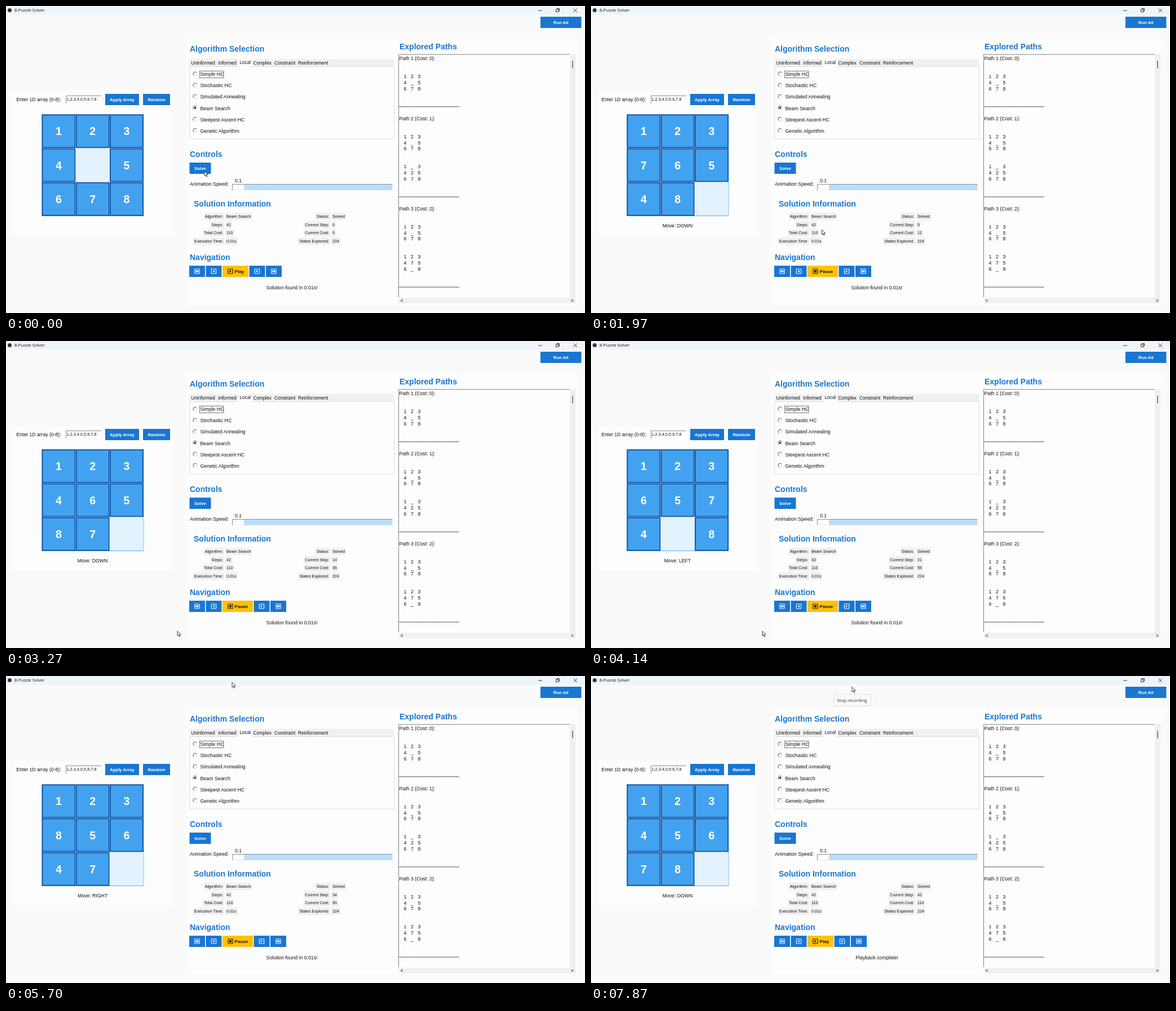
An HTML page that plays this animation: 1027x545 px, repeating every 7900 ms.

```html
<!DOCTYPE html>
<html lang="en">
<head>
<meta charset="utf-8">
<title>8-Puzzle Solver</title>
<style>
  html, body { margin: 0; height: 100%; overflow: hidden; background: #fafafb; }
  svg { display: block; width: 100vw; height: 100vh; }
  text { font-family: "Liberation Sans", Arial, sans-serif; white-space: pre; }
  .ui { font-family: "Open Sans", sans-serif; }
</style>
</head>
<body>
<svg id="stage" viewBox="0 0 1027 545"></svg>
<script>
const LOOP = 7900;
const BLUE = '#1976d2', INK = '#111', GREY = '#f0f0f0', PANEL = '#fdfdfd';
const stage = document.getElementById('stage');

// ---------- drawing helpers ----------
function el(tag, attrs, parent = stage) {
  const node = document.createElementNS(stage.namespaceURI, tag);
  for (const key in attrs) node.setAttribute(key, attrs[key]);
  return parent.appendChild(node);
}
const rect = (x, y, width, height, fill, more, parent) =>
  el('rect', { x, y, width, height, fill, ...more }, parent);
const path = (d, stroke, more, parent) =>
  el('path', { d, stroke, fill: 'none', ...more }, parent);

// y is the middle of the capitals
function text(x, y, content, size = 8.75, more = {}, parent) {
  const node = el('text', { x, y: y + size * 0.36, 'font-size': size, fill: INK, ...more }, parent);
  node.textContent = content;
  return node;
}
const MID = { 'text-anchor': 'middle' };
const BOLD = { 'font-weight': 700 };
const heading = (x, y, content) => text(x, y, content, 14, { ...BOLD, fill: BLUE });

function button(x, y, w, h, label) {
  rect(x, y, w, h, BLUE);
  text(x + w / 2, y + h / 2, label, 7.8, { ...MID, ...BOLD, fill: '#fff' });
}

// text on a grey box that fits its content; returns a setter
function chip(x, y, content, alignEnd) {
  const box = rect(x, y - 6.5, 0, 13, GREY);
  const label = text(x, y, content, 7.2, alignEnd ? { 'text-anchor': 'end' } : {});
  const set = value => {
    if (label.textContent === value && box.getAttribute('width') > 0) return;
    label.textContent = value;
    const w = label.getComputedTextLength();
    box.setAttribute('width', w + 4);
    box.setAttribute('x', (alignEnd ? x - w : x) - 2);
  };
  set(content);
  return set;
}

const ICONS = {
  edge: 'M-2.5-1.6h5v3.2h-5z',
  prev: 'M1.5-2.3v4.6l-3.4-2.3z',
  next: 'M-1.5-2.3v4.6l3.4-2.3z',
  stop: 'M-2-2h4v4h-4z',
};
function icon(x, y, kind, color, parent) {
  const g = el('g', { transform: `translate(${x} ${y})` }, parent);
  rect(-4.2, -4, 8.4, 8, 'none', { stroke: color, 'stroke-width': 1.1, rx: 0.8 }, g);
  el('path', { d: ICONS[kind], fill: color }, g);
}

// ---------- window ----------
rect(0, 0, 1027, 15.5, '#eff4f9');
el('circle', { cx: 6.5, cy: 7.5, r: 3.5, fill: '#30363d' });
text(15, 7.5, '8-Puzzle Solver', 7.7, { class: 'ui' });
path('M944 8h7M1006.5 4.5l6.5 6.5m0-6.5l-6.5 6.5M975.5 6h4.5v4.5h-4.5zM977 6v-1.5h4.5v4.5h-1.5', '#222',
  { 'stroke-width': 0.9 });
button(948, 19, 72.5, 20, 'Run All');

// ---------- board panel ----------
rect(13, 152, 281, 256, PANEL);
text(18.5, 166, 'Enter 1D array (0-8):', 8.65);
rect(106, 159, 63, 14, '#fff');
path('M106.5 173v-13.5h62.5', '#8a8a8a');
text(107.5, 165.7, '1,2,3,4,0,5,6,7,8', 7.35);
button(176, 156, 60, 20, 'Apply Array');
button(243, 156, 48, 20, 'Random');

rect(63.7, 192.5, 180.2, 180, 'none', { stroke: '#42a5f5' });
const PITCH = 60.2;
const cells = Array.from({ length: 9 }, (_, i) => {
  const x = 63.5 + (i % 3) * PITCH, y = 192.3 + Math.floor(i / 3) * PITCH;
  rect(x, y, 59.6, 59.4, '#e3f2fd');
  const tile = el('g');
  rect(x + 1, y + 1, 58, 58, '#43a2ef', { stroke: '#0f4f9f', 'stroke-width': 1.8 }, tile);
  const digit = text(x + 30, y + 30, '', 19.5, { ...MID, ...BOLD, fill: '#fff' }, tile);
  return { tile, digit };
});
const moveLabel = text(153.5, 390, '', 8.7, MID);

// ---------- algorithm panel ----------
rect(320, 56, 694, 475, PANEL);
heading(326, 75.5, 'Algorithm Selection');
rect(325, 94, 363, 13, GREY);
rect(325.5, 107.5, 363, 128.5, PANEL, { stroke: '#dcdcdc' });
rect(412, 92, 24, 16, PANEL);
[[328.5, 'Uninformed'], [376.5, 'Informed'], [414.5, 'Local'], [438.5, 'Complex'],
 [476, 'Constraint'], [518, 'Reinforcement']]
  .forEach(([x, name]) => text(x, name === 'Local' ? 100 : 101.5, name, 8.2));

['Simple HC', 'Stochastic HC', 'Simulated Annealing', 'Beam Search', 'Steepest Ascent HC', 'Genetic Algorithm']
  .forEach((name, i) => {
    const y = 121.2 + i * 20.05;
    el('circle', { cx: 335.5, cy: y - 0.5, r: 3.5, fill: '#fff', stroke: '#d0d0d0', 'stroke-width': 0.8 });
    path(`M333 ${y + 2}a3.5 3.5 0 0 1 5-5`, '#555');
    if (name === 'Beam Search') el('circle', { cx: 335.5, cy: y - 0.5, r: 1.7, fill: '#000' });
    text(344.5, y, name, 8.8);
  });
rect(343.5, 115.5, 42.5, 12, 'none', { stroke: '#555', 'stroke-width': 0.8 });

// ---------- controls ----------
heading(326, 263, 'Controls');
button(325.5, 278, 38, 20, 'Solve');
text(326, 315.5, 'Animation Speed:');
text(412, 309.5, '0.1', 8.75, MID);
rect(401, 316, 284.5, 11, '#bbdefb');
rect(402, 317, 20, 9.5, PANEL);
path('M401.5 327v-10.5h284', '#8a8f94');

// ---------- solution information ----------
heading(333, 351, 'Solution Information');
const INFO_Y = [373.5, 388.2, 402.9, 417.6];
[['Algorithm:', 'Beam Search', 'Status:', 'Solved'],
 ['Steps:', '42', 'Current Step:', '0'],
 ['Total Cost:', '110', 'Current Cost:', '0'],
 ['Execution Time:', '0.01s', 'States Explored:', '224']]
  .forEach(([a, b, c, d], i) => {
    chip(385, INFO_Y[i], a, true);
    chip(391, INFO_Y[i], b);
    chip(573, INFO_Y[i], c, true);
    if (i === 0 || i === 3) chip(579, INFO_Y[i], d);
  });
const setStep = chip(579, INFO_Y[1], '0');
const setCost = chip(579, INFO_Y[2], '0');

// ---------- navigation ----------
heading(326, 446, 'Navigation');
function navButton(x, kind, parent) {
  rect(x, 461, 28, 20, BLUE, {}, parent);
  icon(x + 14, 471, kind, '#fff', parent);
}
function toggle(label, kind, width) {
  const g = el('g');
  rect(384, 461, width, 20, '#ffc107', {}, g);
  icon(398, 471, kind, INK, g);
  text(405.5, 471, label, 8.1, BOLD, g);
  navButton(385.5 + width, 'next', g);
  navButton(415 + width, 'edge', g);
  return g;
}
navButton(325, 'edge');
navButton(354.5, 'prev');
const playGroup = toggle('Play', 'next', 46);
const pauseGroup = toggle('Pause', 'stop', 54);
const message = text(507, 500, '', 8.7, MID);

// ---------- explored paths ----------
heading(698, 72, 'Explored Paths');
rect(1000, 85, 10.5, 443, GREY);
rect(697, 518, 313, 10, GREY);
path('M696.5 517v-431h303', '#808080');
rect(1004, 97, 2, 13.5, '#858585');
el('path', { d: 'M699 523l4.5-3v6zM1007.5 523l-4.5-3v6z', fill: '#8f8f8f' });

const lineY = n => 93 + n * 10.675;
function miniGrid(line, tiles) {
  [...tiles].forEach((c, i) =>
    text(708 + (i % 3) * 12.5, lineY(line + Math.floor(i / 3)), c, 8.75, MID));
}
[0, 10, 25].forEach((line, i) => text(697.5, lineY(line), `Path ${i + 1} (Cost: ${i}):`));
[8, 23, 38].forEach(line => path(`M697.5 ${lineY(line) + 0.4}h106.5`, '#222', { 'stroke-dasharray': '2.1 .57' }));
[3, 13, 28].forEach(line => miniGrid(line, '1234_5678'));
miniGrid(18, '1_3425678');
miniGrid(33, '1234756_8');

// ---------- overlay ----------
const tooltip = el('g');
rect(430.5, 34, 66, 20, '#00000018', { rx: 2.5 }, tooltip);
rect(430.5, 33, 66, 20, '#f9f9f9', { rx: 2, stroke: '#dedede', 'stroke-width': 0.8 }, tooltip);
text(463, 42.8, 'Stop recording', 7.8, { ...MID, class: 'ui', fill: '#333' }, tooltip);
const cursor = el('path', {
  d: 'M0 0v8.6l2-1.9 1.5 3.4 1.4-.6-1.5-3.3h2.8z', fill: '#fff', stroke: '#111', 'stroke-width': 0.8,
});

// ---------- solution: every blank move with its cost ----------
const MOVES = {
  U: { name: 'UP', shift: -3, cost: 1 },
  D: { name: 'DOWN', shift: 3, cost: 2 },
  L: { name: 'LEFT', shift: -1, cost: 3 },
  R: { name: 'RIGHT', shift: 1, cost: 4 },
};
const states = [{ board: [1, 2, 3, 4, 0, 5, 6, 7, 8], cost: 0, label: '' }];
for (const key of 'DLURDRULLDRURDLLURRDLULDRRULDLURDRULLDRURD') {
  const { board, cost } = states[states.length - 1];
  const move = MOVES[key], next = [...board], from = board.indexOf(0);
  [next[from], next[from + move.shift]] = [next[from + move.shift], 0];
  states.push({ board: next, cost: cost + move.cost, label: 'Move: ' + move.name });
}

// ---------- timeline ----------
const STEP_KEYS = [[1000, 0], [1965, 6], [3190, 14], [4060, 21], [5670, 34], [6760, 42]];
const CURSOR_KEYS = [[150, 352, 293], [900, 407, 468], [1450, 407, 468], [1900, 409.5, 397], [2050, 409.5, 397],
  [2800, 304, 515], [4850, 304, 515], [5550, 401, 11.5], [5850, 401, 11.5], [6400, 463, 19.5]];
const PLAY_START = 1000, PLAY_END = 6900, TOOLTIP_START = 7350, LABEL_LAG = 30;
const linear = k => k, smooth = k => k * k * (3 - 2 * k);

function track(keys, t, ease) {
  const i = keys.findIndex(key => key[0] > t);
  if (i === 0) return keys[0].slice(1);
  if (i < 0) return keys[keys.length - 1].slice(1);
  const a = keys[i - 1], b = keys[i], k = ease((t - a[0]) / (b[0] - a[0]));
  return a.slice(1).map((v, n) => v + (b[n + 1] - v) * k);
}
const stepAt = t => Math.floor(track(STEP_KEYS, t, linear)[0] + 1e-6);
const show = (node, on) => node.setAttribute('visibility', on ? 'visible' : 'hidden');

function render(t) {
  states[stepAt(t)].board.forEach((value, i) => {
    show(cells[i].tile, value);
    cells[i].digit.textContent = value || '';
  });
  const step = stepAt(t - LABEL_LAG);
  moveLabel.textContent = states[step].label;
  setStep(String(step));
  setCost(String(states[step].cost));

  const playing = t >= PLAY_START && t < PLAY_END;
  show(playGroup, !playing);
  show(pauseGroup, playing);
  message.textContent = t < PLAY_END ? 'Solution found in 0.01s!' : 'Playback complete!';
  show(tooltip, t >= TOOLTIP_START);
  cursor.setAttribute('transform', `translate(${track(CURSOR_KEYS, t, smooth)})`);
}

const start = performance.now();
function frame() {
  render((performance.now() - start) % LOOP);
  requestAnimationFrame(frame);
}
frame();
</script>
</body>
</html>
```
